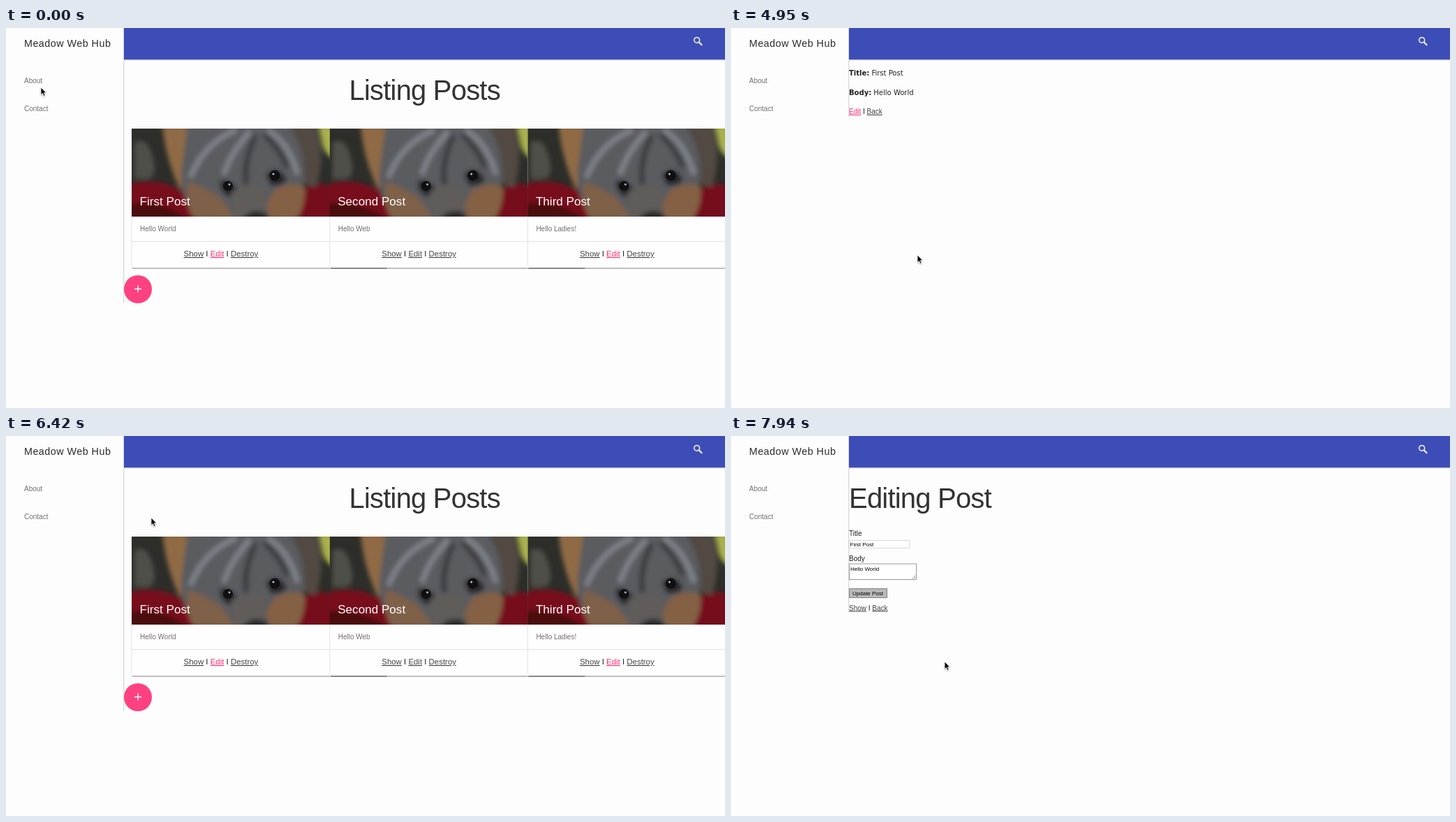
Animation of 1030 by 544 pixels, one loop 8 s. Source, as an HTML page:

```html
<!DOCTYPE html>
<html lang="en">
<head>
<meta charset="utf-8">
<title>Posts</title>
<style>
  html, body { margin: 0; width: 100%; height: 100%; overflow: hidden; background: #fdfdfd; }
  svg { display: block; width: 100vw; height: 100vh; }
  text { font: 10px "Liberation Sans", Arial, sans-serif; fill: #212121; white-space: pre; }
  .brand { font-size: 14.3px; letter-spacing: .5px; fill: #2b2b2b; }
  .soft { fill: #707070; }
  .head { font-size: 40px; letter-spacing: -.8px; fill: #333; }
  .caption { font-size: 17.1px; fill: #fff; }
  .big { font-size: 11.43px; }
  .small { font-size: 8px; fill: #000; }
  .wide { font-family: "DejaVu Sans", Verdana, sans-serif; }
  .bold { font-weight: bold; }
  .a { fill: #444; text-decoration: underline; }
  .pink { fill: #ff2d75; }
  .hot { fill: #fff; }
</style>
</head>
<body>
<svg viewBox="0 0 1030 544">
  <defs>
    <filter id="blur" x="-10%" y="-10%" width="120%" height="120%"><feGaussianBlur stdDeviation="3"/></filter>
    <filter id="drop" x="-50%" y="-50%" width="200%" height="200%">
      <feDropShadow dx="0" dy="1" stdDeviation=".8" flood-opacity=".35"/>
    </filter>
    <symbol id="photo" width="284" height="126" viewBox="0 0 284 126">
      <rect width="284" height="126" fill="#2d2e29"/>
      <g filter="url(#blur)">
        <path d="M4 20Q22 10 30 40T22 72H4Z" fill="#4f5049"/>
        <path d="M268-4H290V44Q274 36 272 14Z" fill="#a9b04b"/>
        <path d="M-4 80Q30 70 62 84T120 130H-4Z" fill="#780c1c"/>
        <path d="M-4 108Q40 100 84 130H-4Z" fill="#4c0811"/>
        <path d="M235 96Q262 70 290 84V130H230Z" fill="#740b1a"/>
        <path d="M44-4H88L84 60 70 88Q50 50 44-4Z" fill="#8f6a45"/>
        <path d="M216-4H266Q278 40 264 84L228 74Z" fill="#514a42"/>
        <path d="M80-4H226Q252 34 246 80L232 130H96Q66 100 72 56Z" fill="#5a5c60"/>
        <path d="M82 76Q104 84 126 98L150 130H90Q72 104 82 76Z" fill="#7f6048"/>
        <path d="M204 88Q230 74 248 84 250 110 236 130H180Z" fill="#846044"/>
        <path d="M126 76Q138 70 150 84T140 98Q126 92 126 76ZM192 66Q206 52 218 66T200 82Z" fill="#28272a"/>
        <path d="M142 94Q166 66 192 88L196 130H144Z" fill="#5f5b5a"/>
        <path d="M158 130Q166 118 180 118T198 130Z" fill="#2c2a2b"/>
        <path d="M150 2Q104 20 84 70M170 4Q142 34 132 66M194 2Q226 20 238 66" fill="none" stroke="#7e8288" stroke-width="8"/>
        <path d="M178 10Q160 44 164 80M190 8Q216 34 222 56" fill="none" stroke="#3b3d41" stroke-width="8"/>
      </g>
      <g fill="#101012"><circle cx="138" cy="82" r="7"/><circle cx="205" cy="67" r="7.5"/></g>
      <g fill="#bcc3ca"><circle cx="140" cy="80" r="1.4"/><circle cx="203" cy="65" r="1.5"/></g>
    </symbol>
  </defs>

  <rect width="1030" height="544" fill="#fdfdfd"/>
  <rect id="edge" x="168.3" y="0" width="1" fill="#ccc"/>
  <rect x="169" y="45" width="861" height="1.3" fill="#bfc1da"/>
  <rect x="169" width="861" height="45" fill="#3c4db7"/>
  <g fill="none" stroke="#fff">
    <circle cx="989.7" cy="17.3" r="3.9" stroke-width="1.5"/>
    <path d="M992.6 20.2L997.2 24.8" stroke-width="2"/>
  </g>
  <text class="brand" x="26" y="27">Meadow Web Hub</text>
  <text class="soft" x="26" y="79">About</text>
  <text class="soft" x="26" y="118.5">Contact</text>

  <g id="list">
    <text class="head" x="491.5" y="102.7">Listing Posts</text>
    <g id="cards"></g>
    <circle cx="189" cy="374" r="20" fill="#ff4081"/>
    <path d="M184 373.5H194M189 368.5V378.5" stroke="#fff" stroke-width="1.5"/>
  </g>

  <g id="show">
    <text class="wide" x="169" y="68"><tspan class="bold">Title:</tspan> First Post</text>
    <text class="wide" x="169" y="96"><tspan class="bold">Body:</tspan> Hello World</text>
    <text x="169" y="123"><tspan class="a pink">Edit</tspan> I <tspan class="a">Back</tspan></text>
  </g>

  <g id="edit">
    <text class="head" x="169" y="102.7">Editing Post</text>
    <text x="169" y="143">Title</text>
    <rect x="169.5" y="149.5" width="86" height="11" fill="#fff" stroke="#d8d8d8"/>
    <text class="small" x="170.5" y="158">First Post</text>
    <text x="169" y="179">Body</text>
    <rect x="169.5" y="183" width="96" height="22.5" fill="#fff" stroke="#999"/>
    <path d="M259.5 204.5L264.5 199.5M262 204.5L264.5 202" stroke="#777" stroke-width=".8"/>
    <text class="small" x="171" y="193">Hello World</text>
    <rect x="169.5" y="218.5" width="54" height="13" fill="#b9b9b9" stroke="#858585"/>
    <text class="small" x="174" y="228">Update Post</text>
    <text x="169" y="249.5"><tspan class="a">Show</tspan> I <tspan class="a">Back</tspan></text>
  </g>

  <g id="pressed"></g>
  <g id="cursor" filter="url(#drop)">
    <path id="arrow" d="M0 0V10.8L2.4 8.5 4.1 12.4 6 11.6 4.4 7.8H7.6Z" fill="#000" stroke="#fff" stroke-width=".8"/>
    <path id="hand" d="M-1.4 1.2a1.2 1.2 0 0 1 2.4 0V5l2 .3 2 .6 1.6 1V9.4L5.4 13.5H-.6L-4 8.8Q-4.4 6.8-2.8 7.2L-1.4 8.4Z" fill="#fff" stroke="#000" stroke-width="1"/>
  </g>
</svg>
<script>
const $ = id => document.getElementById(id);
const LOOP = 8000, PITCH = 283.7;

const card = ([title, body, tone], i) => `
  <g transform="translate(${180 + i * PITCH} 0)">
    <rect y="270" width="284" height="74" fill="#fefefe"/>
    <path d="M0 270V344M0 305.5H284" stroke="#e2e2e2"/>
    <path d="M1 344H284" stroke="#aaa" stroke-width="1.5"/>
    ${i ? '<path d="M1 344H82" stroke="#777" stroke-width="1.5"/>' : ''}
    <use href="#photo" y="144"/>
    <text class="caption" x="11.5" y="254">${title} Post</text>
    <text class="soft" x="12" y="291">Hello ${body}</text>
    <text class="big" x="74.6" y="327"><tspan class="a">Show</tspan> I <tspan class="a ${tone}">Edit</tspan> I <tspan class="a">Destroy</tspan></text>
  </g>`;
$('cards').innerHTML = [['First', 'World', 'pink'], ['Second', 'Web', ''], ['Third', 'Ladies!', 'pink']].map(card).join('');

// page start times, with the height of the sidebar edge
const pages = [[0, 'list', 393], [4950, 'show', 127], [6420, 'list', 393], [7940, 'edit', 252]];

// links the pointer meets: page, label, x, top, width
const links = [
  ['list', 'Show', 254.6, 318, 28.6],
  ['list', 'Edit', 292.7, 318, 20],
  ['list', 'Destroy', 321.7, 318, 39.5],
  ['show', 'Back', 194.4, 113.5, 22.4]
];
// pressed spans: start, end, link
const presses = [[1950, 4950, 0], [6120, 6420, 3], [7640, 7940, 1]];

// pointer moves: first step, last step, step count, goal
const moves = [
  [150, 910, 6, 267, 325],
  [1350, 1650, 3, 266, 332],
  [1800, 1950, 2, 267, 325],
  [5540, 6120, 5, 208, 117],
  [6570, 7340, 6, 346, 324],
  [7490, 7640, 2, 306, 323]
];

function pointerAt(t) {
  let x = 50, y = 85;
  for (const [from, to, n, gx, gy] of moves) {
    if (t < from) break;
    const step = t >= to ? n : 1 + Math.floor((t - from) / (to - from) * (n - 1));
    const u = step / n, e = u * u * (3 - 2 * u);
    x += (gx - x) * e;
    y += (gy - y) * e;
  }
  return [x, y];
}

const toggle = (id, on) => $(id).style.display = on ? '' : 'none';

function pressedLink(t) {
  const press = presses.find(([from, to]) => t >= from && t < to);
  if (!press) return '';
  const [page, label, x, y, w] = links[press[2]];
  const big = page === 'list';
  return `<rect x="${x - .4}" y="${y}" width="${w + .4}" height="12"/>
    <text class="a hot ${big ? 'big' : ''}" x="${x}" y="${y + (big ? 9 : 9.5)}">${label}</text>`;
}

let lastPress = '';
function draw(now) {
  const t = now % LOOP;
  const [, page, edge] = pages.filter(p => t >= p[0]).pop();
  for (const id of ['list', 'show', 'edit']) toggle(id, id === page);
  $('edge').setAttribute('height', edge);

  const press = pressedLink(t);
  if (press !== lastPress) $('pressed').innerHTML = lastPress = press;

  const [x, y] = pointerAt(t);
  const over = links.some(([p, , lx, ly, w]) => p === page && x >= lx && x <= lx + w && y >= ly && y <= ly + 12.5);
  toggle('hand', over);
  toggle('arrow', !over);
  $('cursor').setAttribute('transform', `translate(${x} ${y})`);
}

let start;
function tick(now) {
  start ??= now;
  draw(now - start);
  requestAnimationFrame(tick);
}
draw(0);
requestAnimationFrame(tick);
</script>
</body>
</html>
```
